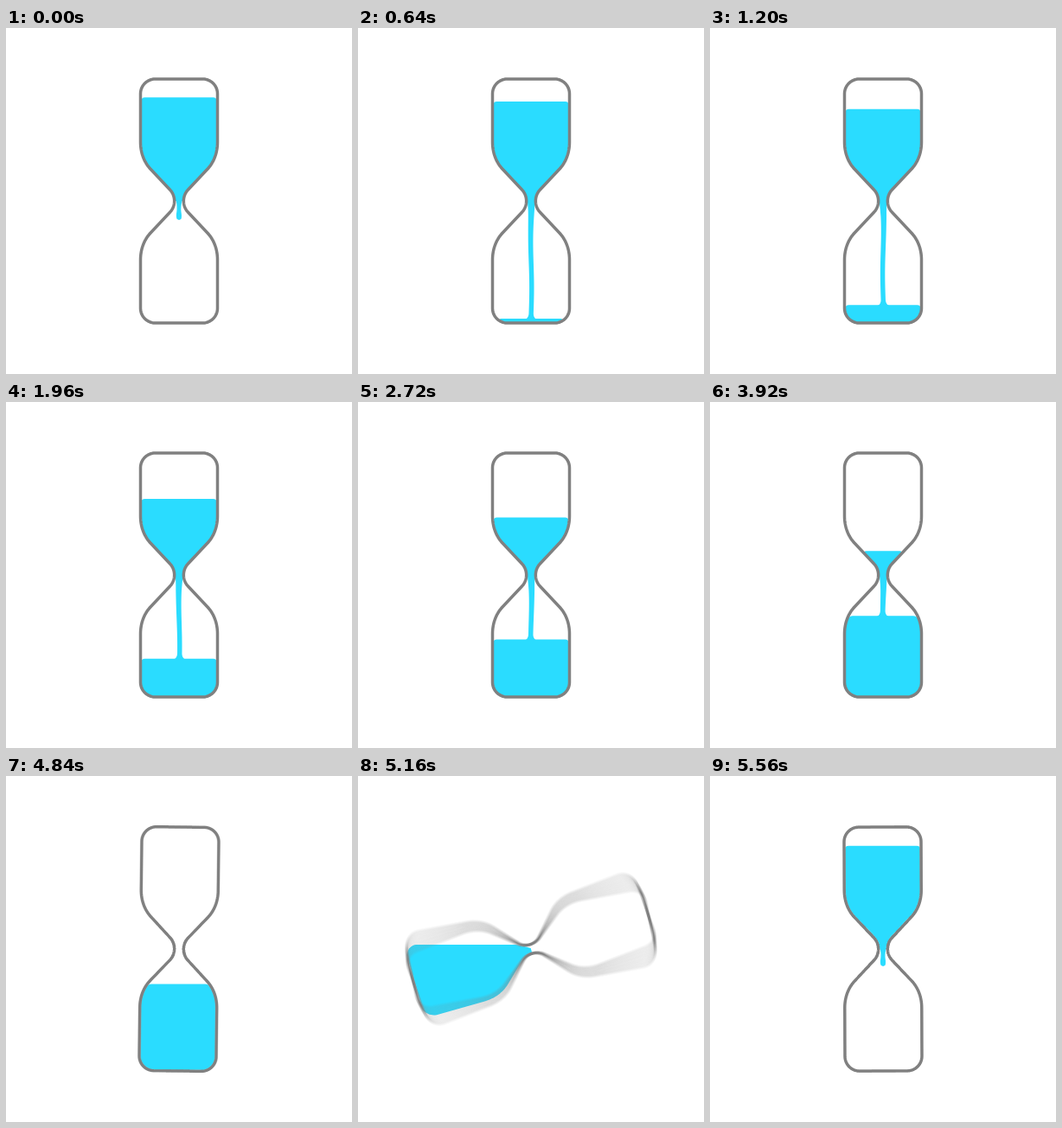
These frames come from a looping animation (400 px wide and 400 px high, 5.6 s). An HTML page with a canvas:

```html
<!DOCTYPE html>
<html lang="en">
<head>
<meta charset="utf-8">
<title>Hourglass</title>
<style>
html, body { margin: 0; width: 100%; height: 100%; overflow: hidden; background: #fff; }
canvas { display: block; width: 400px; height: 400px; }
</style>
</head>
<body>
<canvas id="stage" width="400" height="400"></canvas>
<script>
const LOOP = 5600, STEP = 40;
const TURN_START = 4757, TURN_END = 5617;
const LINE = '#808080', WATER = '#2adcff';
const ctx = document.getElementById('stage').getContext('2d');
const layer = document.createElement('canvas');
layer.width = layer.height = 400;
const glass = layer.getContext('2d');

// --- geometry, centred on the neck ---
function bezier(a, b, c, d, n) {
  const out = [];
  for (let i = 0; i <= n; i++) {
    const u = i / n, v = 1 - u;
    out.push([0, 1].map(k =>
      v * v * v * a[k] + 3 * v * v * u * b[k] + 3 * v * u * u * c[k] + u * u * u * d[k]));
  }
  return out;
}

const side = [
  ...bezier([5.35, 0], [5.35, 4.5], [6.9, 9], [10, 12.5], 12),
  ...bezier([33, 37], [40.5, 45], [44.5, 56], [44.5, 68], 16),
  ...bezier([44.5, 124], [44.5, 133.4], [36.9, 141], [27.5, 141], 16)
];
const flipX = p => [-p[0], p[1]];
const flipY = p => [p[0], -p[1]];
const lowerHalf = [...side, ...side.map(flipX).reverse()];
const outline = [...lowerHalf, ...lowerHalf.map(flipY).reverse()];
const bulb = lowerHalf.map(([x, y]) => [x - Math.sign(x), y > 140 ? 140 : y]);

function rotate(points, a) {
  const c = Math.cos(a), s = Math.sin(a);
  return points.map(([x, y]) => [x * c - y * s, x * s + y * c]);
}

// leftmost and rightmost crossing of a polygon with a horizontal line
function span(poly, y) {
  let left = Infinity, right = -Infinity;
  poly.forEach((p, i) => {
    const q = poly[(i + 1) % poly.length];
    if ((p[1] <= y) === (q[1] <= y)) return;
    const x = p[0] + (q[0] - p[0]) * (y - p[1]) / (q[1] - p[1]);
    left = Math.min(left, x);
    right = Math.max(right, x);
  });
  return [left, right];
}

// --- motion ---
function curve(keys) {
  const slope = i => {
    const a = keys[Math.max(i - 1, 0)], b = keys[Math.min(i + 1, keys.length - 1)];
    return (b[1] - a[1]) / (b[0] - a[0]);
  };
  return t => {
    const last = keys.length - 1;
    if (t <= keys[0][0]) return keys[0][1];
    if (t >= keys[last][0]) return keys[last][1];
    let i = 0;
    while (t > keys[i + 1][0]) i++;
    const [t0, a] = keys[i], [t1, b] = keys[i + 1];
    const d = t1 - t0, u = (t - t0) / d, v = 1 - u;
    return v * v * (1 + 2 * u) * a + u * u * (3 - 2 * u) * b
      + d * u * v * (v * slope(i) - u * slope(i + 1));
  };
}

const topLevel = curve([[-300, 80], [0, 80.3], [600, 84.5], [1200, 93.8], [1800, 107.7],
  [2720, 133.5], [3000, 141.7], [3920, 172.3], [4560, 200]]);
const lowLevel = curve([[460, 341], [1200, 320.2], [1800, 301.5], [2720, 274.6],
  [3920, 247.2], [4500, 240.2], [4700, 239.5]]);
const tipAt = curve([[-220, 198], [-40, 220], [0, 222], [200, 260], [440, 341]]);

function angleAt(t) {
  const p = Math.min(1, Math.max(0, (t - TURN_START) / (TURN_END - TURN_START)));
  return Math.PI * (p < 0.5 ? 4 * p ** 3 : 1 - 4 * (1 - p) ** 3);
}

// --- water level while turning: the air keeps its share of the bulb ---
const grains = [];
for (let y = 1; y < 140; y += 2) {
  const [l, r] = span(bulb, y);
  for (let x = l + 0.5; x < r; x += 2) grains.push([x, y]);
}
const airBefore = grains.filter(g => g[1] < 39.5).length;
const airAfter = grains.filter(g => g[1] > 119.5).length;

function turnLevel(a) {
  const k = a / Math.PI;
  const ys = rotate(grains, a).map(g => g[1]).sort((m, n) => m - n);
  return 200 + ys[Math.round(airBefore + (airAfter - airBefore) * k)];
}

// --- drawing ---
function trace(c, points) {
  c.beginPath();
  points.forEach(([x, y]) => c.lineTo(200 + x, 200 + y));
  c.closePath();
}

function fillBulb(poly, level) {
  const [l, r] = span(poly, level - 200);
  if (!(r > l)) return;
  const round = Math.min(4, (r - l) / 4);
  let [l2, r2] = span(poly, level + round - 200);
  if (!(r2 > l2)) [l2, r2] = [l, r];
  const y = level + round;
  ctx.save();
  trace(ctx, poly);
  ctx.clip();
  ctx.beginPath();
  ctx.moveTo(200 + l2, y);
  ctx.quadraticCurveTo(200 + l, level, 200 + l + round, level);
  ctx.lineTo(200 + r - round, level);
  ctx.quadraticCurveTo(200 + r, level, 200 + r2, y);
  ctx.lineTo(400, y);
  ctx.lineTo(400, 400);
  ctx.lineTo(0, 400);
  ctx.lineTo(0, y);
  ctx.fill();
  ctx.restore();
}

function drawStream(t) {
  const time = t > 5300 ? t - LOOP : t;
  const tip = tipAt(time), floor = lowLevel(time);
  const falling = tip < floor;
  const end = falling ? tip : floor + 1;
  const drain = Math.max(0, (time - 4520) / 160);
  const start = 198 + 42 * drain * drain;
  if (start >= end - 0.5) return;

  const half = y => {
    const d = end - y, neck = Math.exp(-Math.max(0, y - 200) / 18);
    let h = 2.7 + 1.7 * neck;
    if (falling) {
      h = 2.1 + 2 * Math.exp(-Math.max(0, y - 198) / 5) + 0.9 * Math.exp(-(((d - 5) / 5) ** 2));
      if (d < 3) h = Math.min(h, Math.sqrt(Math.max(0, 9 - (3 - d) ** 2)));
    } else if (d < 7) {
      const u = Math.min(1, 1 - d / 7);
      h += 5 * (1 - Math.sqrt(1 - u * u));
    }
    return drain > 0 ? h * Math.min(1, Math.sqrt((y - start) / 8)) : h;
  };
  const mid = y => 200.2 + 0.6 * Math.min(1, (y - 198) / 20) * Math.sin(y / 18 - time * 0.004);

  const right = [], left = [];
  for (let y = start; ; y = Math.min(end, y + 1)) {
    right.push([mid(y) + half(y) - 200, y - 200]);
    left.unshift([mid(y) - half(y) - 200, y - 200]);
    if (y >= end) break;
  }
  trace(ctx, [...right, ...left]);
  ctx.fill();
}

function drawGlass(t) {
  const from = angleAt(t - 10), sweep = angleAt(t + 10) - from;
  const n = sweep > 0.002 ? 32 : 1;
  glass.clearRect(0, 0, 400, 400);
  glass.globalCompositeOperation = 'lighter';
  glass.globalAlpha = 1 / n;
  glass.strokeStyle = LINE;
  glass.lineWidth = 3.5;
  glass.lineJoin = 'round';
  for (let i = 0; i < n; i++) {
    trace(glass, rotate(outline, from + sweep * (i + 0.5) / n));
    glass.stroke();
  }
  ctx.drawImage(layer, 0, 0);
}

const upperBulb = bulb.map(flipY);

function draw(t) {
  ctx.fillStyle = '#fff';
  ctx.fillRect(0, 0, 400, 400);
  ctx.fillStyle = WATER;
  if (t > TURN_START) {
    const a = angleAt(t);
    fillBulb(rotate(bulb, a), turnLevel(a));
    if (t > 5380) drawStream(t);
  } else {
    const top = topLevel(t), low = lowLevel(t);
    if (top < 199) fillBulb(upperBulb, top);
    if (low < 339.5) fillBulb(bulb, low);
    drawStream(t);
  }
  drawGlass(t);
}

let shown = -1;
const began = performance.now();
function tick() {
  const t = Math.floor(((performance.now() - began + 4) % LOOP) / STEP) * STEP;
  if (t !== shown) draw(shown = t);
  requestAnimationFrame(tick);
}
tick();
</script>
</body>
</html>
```
